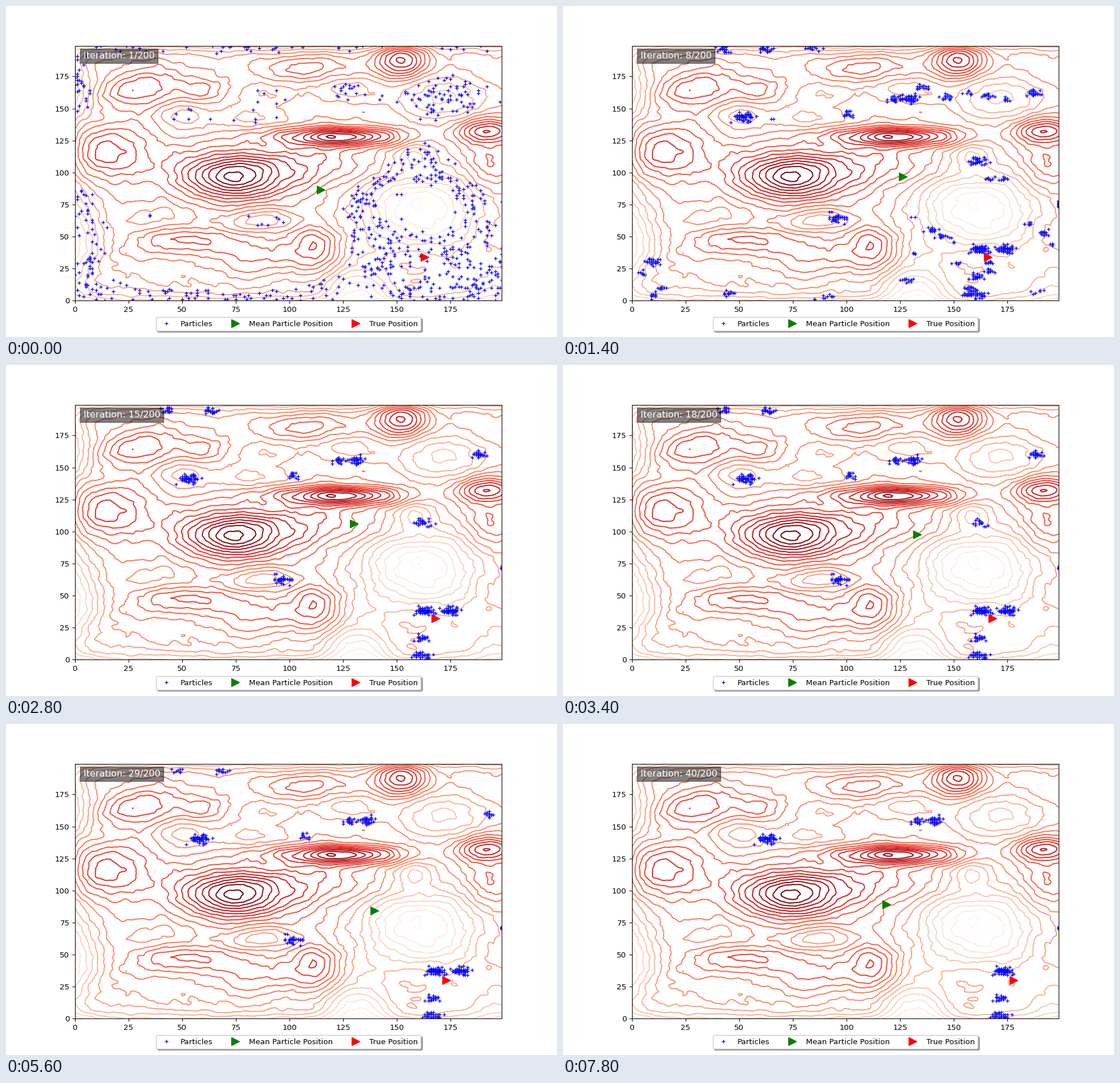
A matplotlib script for the animation above (8000 ms loop, 966 by 580 pixels).

```python
import numpy as np
import matplotlib.pyplot as plt
from matplotlib.animation import FuncAnimation

SIZE, STEPS, DPI = 200, 40, 96

# main hills and hollows: x, y, height in contour steps, x radius, y radius
RELIEF = [
    (72, 97, 18.6, 17, 13), (124, 128, 16.6, 19, 5), (191, 132, 14.4, 9, 7),
    (152, 188, 13.8, 8.5, 11), (15, 116, 12.6, 14, 15), (34, 166, 11.7, 10, 11),
    (17, 162, 10.4, 9, 8), (58, 165, 10.3, 9, 8), (106, 182, 10.5, 13, 7),
    (110, 105, 11.8, 20, 11), (51, 47, 11.6, 16, 8), (113, 43, 11.7, 7, 12),
    (90, 35, 10, 16, 8), (192, 106, 10, 8, 11),
    (162, 70, -.4, 20, 23), (158, 115, 3.6, 8, 8), (87, 63, 5, 12, 6),
    (34, 63, 6.4, 9, 9), (50, 145, 5.4, 9, 8), (86, 143, 5.6, 14, 6),
    (88, 160, 5.6, 11, 7), (127, 165, 5.6, 13, 8), (172, 158, 3.8, 16, 15),
    (132, 8, .8, 11, 17), (172, 20, 5.5, 12, 9), (0, 48, 1.5, 9, 22),
    (0, 168, 3.5, 9, 17), (198, 10, 3.5, 14, 20),
]
# swarms that survive: x, y, particles, step by which they are gone
SWARMS = [
    (49, 144, 60, 99), (119, 158, 20, 99), (127, 159, 36, 99),
    (159, 41, 70, 99), (158, 19, 24, 99), (158, 6, 34, 99),
    (197, 75, 9, 99), (171, 41, 60, 39), (93, 65, 36, 39),
    (98, 147, 18, 36), (184, 163, 26, 33), (60, 197, 26, 34),
    (40, 198, 16, 34), (158, 110, 40, 22),
]
# step, true x and y, mean x and y
KEYS = np.array([
    (1, 163, 34, 114.5, 86.5), (5, 163, 35, 124, 97.8), (11, 168, 33, 128.7, 95.6),
    (15, 168, 32, 130, 106.2), (22, 169, 32, 136.7, 86.5),
    (29, 173, 30, 139.7, 84.3), (40, 178, 30, 118.5, 89.4),
])

rng = np.random.default_rng(7)


def base(x, y):
    """Plain that falls away towards three of its edges."""
    return (8 - 4 * np.exp(-y / 9) - 4.5 * np.exp((y - SIZE) / 6)
            - 2.5 * np.exp(-x / 8))


def smooth_noise(sigma):
    f = np.fft.fftfreq(SIZE)
    low = np.exp(-2 * (np.pi * sigma) ** 2 * (f[:, None] ** 2 + f ** 2))
    n = np.fft.ifft2(np.fft.fft2(rng.normal(size=(SIZE, SIZE))) * low).real
    return n / n.std()


def terrain():
    cx, cy, height, rx, ry = np.transpose(RELIEF)

    def bumps(x, y):
        dx, dy = (x[..., None] - cx) / rx, (y[..., None] - cy) / ry
        return np.exp(-(dx ** 2 + dy ** 2) / 2)

    # choose the weights so that every centre gets its height
    weights = np.linalg.solve(bumps(cx, cy), height - base(cx, cy))
    y, x = np.mgrid[:SIZE, :SIZE].astype(float)
    rough = sum(.07 * s ** .55 * smooth_noise(s) for s in (1, 2, 4, 8))
    return base(x, y) + bumps(x, y) @ weights + rough


def swarm(x, y, n):
    spread = min(2.2, .5 * n ** .4)
    return np.rint(rng.normal((x, y), (spread, .75 * spread), (n, 2)))


def positions(step):
    """True and mean position at a step."""
    k = [np.interp(step, KEYS[:, 0], col) for col in KEYS.T[1:]]
    return np.rint(k[:2]), np.array(k[2:])


ground = terrain()

# particles start where the ground is about as high as at the true position
odds = np.exp(-((ground - 4.5) / 2.2) ** 2) * (ground < 6.6)
cells = rng.choice(SIZE * SIZE, 720, replace=False, p=(odds / odds.sum()).ravel())
cloud = np.column_stack([cells % SIZE, cells // SIZE])
early = np.vstack([swarm(x, y, rng.integers(1, 18)) for x, y in cloud[:38]])
lasting = [(swarm(x, y, n), n, gone) for x, y, n, gone in SWARMS]


def particles(step):
    if step == 1:
        return cloud
    parts = [pts[:int(np.ceil(n * np.clip((gone + 1 - step) / 12, 0, 1)))]
             for pts, n, gone in lasting]
    if step < 13:
        parts.append(early)
    if step < 5:
        parts.append(cloud[:400 // step ** 2])
    shift = positions(step)[0] - positions(5)[0]
    return np.clip(np.vstack(parts) + np.rint(.9 * shift), 0, SIZE - 1)


fig, ax = plt.subplots(figsize=(966 / DPI, 580 / DPI), dpi=DPI)
ax.contour(ground, levels=np.arange(19), cmap="Reds")
dots, = ax.plot([], [], "b+", markersize=5, label="Particles")
mean, = ax.plot([], [], "g>", markersize=10, label="Mean Particle Position")
true, = ax.plot([], [], "r>", markersize=10, label="True Position")
ax.set(xlim=(0, SIZE - 1), ylim=(0, SIZE - 1))
label = ax.text(.02, .95, "", transform=ax.transAxes, color="white", fontsize=12,
                bbox=dict(facecolor="black", alpha=.5))
ax.legend(loc="upper center", bbox_to_anchor=(.5, -.05), ncol=3,
          fancybox=True, shadow=True)


def draw(i):
    step = i + 1
    dots.set_data(*particles(step).T)
    for marker, (x, y) in zip((true, mean), positions(step)):
        marker.set_data([x], [y])
    label.set_text(f"Iteration: {step}/200")
    return dots, mean, true, label


anim = FuncAnimation(fig, draw, frames=STEPS, interval=200, repeat=True,
                     repeat_delay=0, init_func=lambda: draw(0))
plt.show()
```
